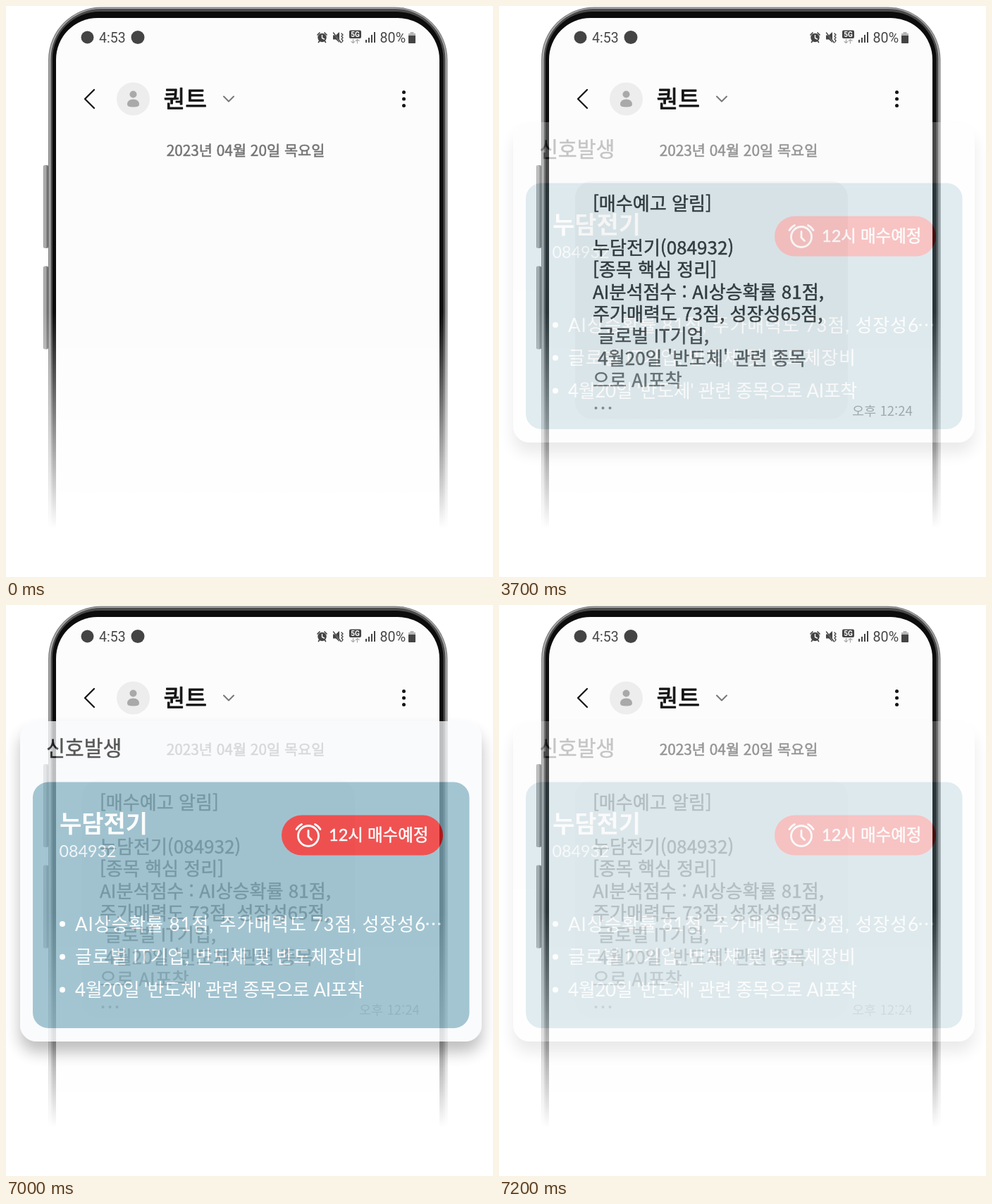
An HTML page for the animation above (7300 ms loop, 691 by 811 pixels).

```html
<!DOCTYPE html>
<html lang="ko">
<head>
<meta charset="utf-8">
<title>매수 알림</title>
<style>
  html, body { margin: 0; width: 100%; height: 100%; overflow: hidden; background: #fff; }
  svg { display: block; width: 691px; height: 811px; }
  text { font-family: 'Noto Sans CJK KR', 'Noto Sans CJK', 'Noto Sans', sans-serif; white-space: pre; }
  .status { font-family: Roboto, sans-serif; fill: #484848; }
  .card text { font-family: Lato, 'Noto Sans CJK KR', 'Noto Sans CJK', sans-serif; fill: #fff; }
  .card .title { fill: #222; }
  .line { fill: none; stroke-linecap: round; stroke-linejoin: round; }
  /* medium weight: a hairline around the regular cut */
  .medium { stroke-width: .5; stroke-linejoin: round; }
  #bubble, #card { opacity: 0; }
</style>
</head>
<body>
<svg viewBox="0 0 691 811">
  <defs>
    <linearGradient id="fade" gradientUnits="userSpaceOnUse" x1="0" y1="435" x2="0" y2="742">
      <stop stop-color="#fff"/>
      <stop offset="1" stop-color="#fff" stop-opacity="0"/>
    </linearGradient>
    <mask id="fadeOut" maskUnits="userSpaceOnUse" x="0" y="0" width="691" height="811">
      <rect width="691" height="811" fill="url(#fade)"/>
    </mask>
    <linearGradient id="metal">
      <stop stop-color="#8c8c8c"/>
      <stop offset=".3" stop-color="#bababa"/>
      <stop offset="1" stop-color="#5c5c5c"/>
    </linearGradient>
    <filter id="shadow" filterUnits="userSpaceOnUse" x="-30" y="110" width="750" height="600">
      <feDropShadow dx="0" dy="15" stdDeviation="10.500" flood-opacity=".34"/>
    </filter>
    <g id="alarm" class="line">
      <circle r="14.5"/>
      <path d="M-17-9.5A17 17 0 0 1-9.5-16.5M17-9.5A17 17 0 0 0 9.5-16.5M0-7.5V1L4.5 5.5"/>
    </g>
  </defs>

  <g mask="url(#fadeOut)">
    <!-- phone body -->
    <g fill="url(#metal)">
      <rect x="53" y="226" width="7" height="118" rx="2"/>
      <rect x="53" y="369.500" width="7" height="118" rx="2"/>
    </g>
    <rect x="60" y="1.500" width="566.500" height="900" rx="75" fill="#868686"/>
    <rect x="61.500" y="3" width="563.500" height="900" rx="73.500" fill="#b0b0b0"/>
    <rect x="63.500" y="4" width="560" height="900" rx="71.500" fill="#4a4a4a"/>
    <rect x="66" y="8" width="554.500" height="900" rx="67" fill="#0c0c0c"/>
    <rect x="71" y="17" width="544" height="900" rx="59" fill="#fcfcfc"/>

    <!-- status bar -->
    <g fill="#444">
      <circle cx="115.500" cy="44.500" r="9"/>
      <circle cx="187" cy="44.500" r="9.500"/>
      <text class="status" x="132" y="51.500" font-size="19.500">4:53</text>
      <circle cx="448.500" cy="45" r="6.200"/>
      <path d="M442 41l3-3M455 41l-3-3M444.500 50l-1 1.500M452.500 50l1 1.500" class="line" stroke="#444" stroke-width="1.700"/>
      <path d="M448.500 41.500v4l3 1.500" class="line" stroke="#fcfcfc" stroke-width="1.400"/>
      <path d="M464 41.500h4l5-4.500v15l-5-4.500h-4z"/>
      <path d="M464 37l11 15" class="line" stroke="#fcfcfc" stroke-width="1.600"/>
      <path d="M464.500 38l11 14M476 39l2 2-2 2 2 2-2 2 2 2-1 2" class="line" stroke="#444" stroke-width="1.400"/>
      <rect x="487" y="34.500" width="17" height="11.500" rx="2"/>
      <text x="495.500" y="44" font-size="10" text-anchor="middle" style="font-family:Roboto,sans-serif;font-weight:700;fill:#fff">5G</text>
      <path d="M492.500 47v5.500l-2.500-2M492.500 52.500l2-2M498.500 53v-5.500l-2 2M498.500 47.500l2.500 2" class="line" stroke="#aaa" stroke-width="1.200"/>
      <path d="M510 48h2v4h-2zM514 45h2v7h-2zM518 41h2v11h-2zM522 37h2v15h-2z"/>
      <text class="status" x="530.500" y="51.500" font-size="19.700">80%</text>
      <path d="M573.500 37h5v2h2.500v13q0 1-1 1h-8q-1 0-1-1v-13h2.500z" fill="#b5b5b5"/>
      <path d="M571 42h10v10q0 1-1 1h-8q-1 0-1-1z"/>
    </g>

    <!-- chat header -->
    <path d="M125 119L112 132L125 145" class="line" stroke="#151515" stroke-width="2.300"/>
    <circle cx="180.500" cy="132" r="23.500" fill="#ededed"/>
    <g fill="#a9a9a9">
      <circle cx="180.500" cy="125.500" r="5"/>
      <path d="M172 140q0-7.500 8.500-7.500t8.500 7.500q0 3.500-8.500 3.500t-8.500-3.500z"/>
    </g>
    <text class="medium" x="223.500" y="144" font-size="33.500" fill="#151515" stroke="#151515" style="stroke-width:.9">퀀트</text>
    <path d="M309 128.500L316 135.500L323 128.500" class="line" stroke="#777" stroke-width="2"/>
    <g fill="#151515">
      <circle cx="564.500" cy="122.500" r="2.500"/>
      <circle cx="564.500" cy="132" r="2.500"/>
      <circle cx="564.500" cy="141.500" r="2.500"/>
    </g>
    <text class="medium" x="340" y="213" font-size="20.800" text-anchor="middle" fill="#737373" stroke="#737373">2023년 04월 20일 목요일</text>

    <g id="bubble">
      <rect x="108" y="248.500" width="387" height="338" rx="24" fill="#f2f2f2"/>
      <g id="message" class="medium" font-size="26.050" fill="#151515" stroke="#151515"></g>
      <g fill="#1a1a1a">
        <circle cx="137.500" cy="571" r="2"/>
        <circle cx="147.500" cy="571" r="2"/>
        <circle cx="157.500" cy="571" r="2"/>
      </g>
      <text x="501" y="581.500" font-size="18.600" fill="#5c5c5c">오후 12:24</text>
    </g>
  </g>

  <g id="card" class="card">
    <rect x="20" y="165" width="655" height="455" rx="24" fill="#f8fafd" filter="url(#shadow)"/>
    <text class="title medium" x="57" y="213.500" font-size="29.200" stroke="#222">신호발생</text>
    <rect x="38" y="251.500" width="619.500" height="349.500" rx="22" fill="#85b2c3"/>
    <text x="76" y="323" font-size="34" font-weight="700">누담전기</text>
    <text x="75.500" y="357.500" font-size="23.300" opacity=".85">084932</text>
    <rect x="391" y="298.500" width="229" height="57" rx="28.500" fill="#ec1a1a"/>
    <use href="#alarm" x="429" y="328" stroke="#fff" stroke-width="2.800"/>
    <text class="medium" x="458" y="335" font-size="23.500" stroke="#fff">12시 매수예정</text>
    <g id="points" font-size="26" fill="#fff"></g>
    <g fill="#fff">
      <circle cx="598" cy="453" r="1.800"/>
      <circle cx="606.500" cy="453" r="1.800"/>
      <circle cx="615" cy="453" r="1.800"/>
    </g>
  </g>
</svg>
<script>
  const LOOP = 7300;
  const $ = id => document.getElementById(id);

  function add(parent, tag, attrs, text = '') {
    const el = document.createElementNS('http://www.w3.org/2000/svg', tag);
    for (const key in attrs) el.setAttribute(key, attrs[key]);
    el.textContent = text;
    parent.append(el);
  }

  const message = [
    '[매수예고 알림]', '', '누담전기(084932)', '[종목 핵심 정리]',
    'AI분석점수 : AI상승확률 81점,', '주가매력도 73점, 성장성65점,',
    '\u00a0글로벌 IT기업,', "\u00a04월20일 '반도체' 관련 종목", '으로 AI포착'
  ];
  message.forEach((line, i) =>
    add($('message'), 'text', { x: 133, y: 290 + i * 31.4 }, line));

  // text and letter spacing
  const points = [
    ['AI상승확률 81점, 주가매력도 73점, 성장성6', .9],
    ['글로벌 IT기업, 반도체 및 반도체장비', .9],
    ["4월20일 '반도체' 관련 종목으로 AI포착", -.35]
  ];
  points.forEach(([line, spacing], i) => {
    const y = 453 + i * 46.8;
    add($('points'), 'circle', { cx: 80, cy: y, r: 4 });
    add($('points'), 'text', { x: 98, y: y + 9.5, 'letter-spacing': spacing }, line);
  });

  // each step is [time in ms, opacity], held until the next one
  function holdSteps(id, steps) {
    const frames = steps.map(([time, opacity]) =>
      ({ offset: time / LOOP, opacity, easing: 'step-end' }));
    frames.push({ offset: 1, opacity: 0 });
    $(id).animate(frames, { duration: LOOP, iterations: Infinity }).startTime = 0;
  }

  const fadeAway = [[7000, .75], [7100, .5], [7200, .25]];
  holdSteps('bubble', [[0, 0], [1200, 1], ...fadeAway]);
  holdSteps('card', [[0, 0], [3700, .25], [3800, .5], [3900, .75], [4000, 1], ...fadeAway]);
</script>
</body>
</html>
```
